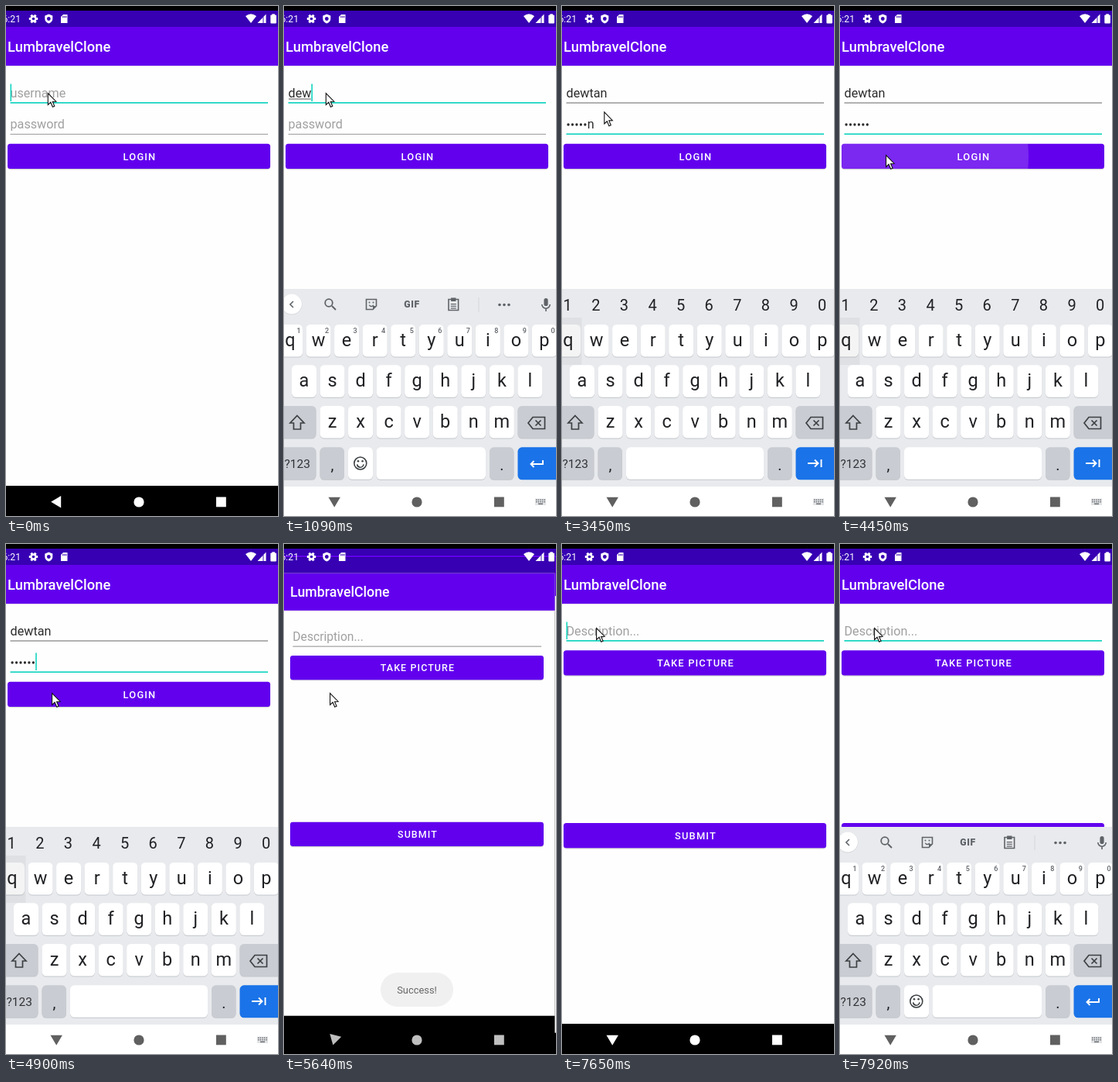
An HTML page with a canvas that plays this animation: 352 px wide and 658 px high, repeating every 8 s.

```html
<!DOCTYPE html>
<html lang="en">
<head>
<meta charset="utf-8">
<title>Login demo</title>
<style>
  html, body { margin: 0; width: 100%; height: 100%; overflow: hidden; background: #000; }
  canvas { display: block; width: 352px; height: 658px; }
</style>
</head>
<body>
<canvas id="stage"></canvas>
<script>
const W = 352, H = 658, LOOP = 8000, STEP = 90;
const USER = 'dewtan', TITLE = 'LumbravelClone';
const PURPLE = '#6200ee', DARK = '#3700b3', TEAL = '#14d4c0';
const INK = '#202124', GREY = '#5f6368', HINT = '#a0a0a0', KEY_GREY = '#c9ccd2';
// Moments of the story in ms.
const NAME_KEYS = 730, PASS_FOCUS = 1900, PASS_BOARD = 2170, PASS_KEYS = 2440;
const PRESS = 4360, SWITCH = 5460, POST_FOCUS = 7290;

const canvas = document.getElementById('stage');
const c = canvas.getContext('2d');
const dpr = window.devicePixelRatio || 1;
canvas.width = W * dpr;
canvas.height = H * dpr;

const clamp = (v, max = 1) => Math.max(0, Math.min(max, v));
const easeOut = p => 1 - (1 - p) ** 2;
const count = (t, start, gap) => clamp(Math.floor((t - start) / gap + 1e-6) + 1, USER.length);
// Progress 0..1 in n hard steps, the first one taken at start.
const steps = (t, start, n) => clamp((Math.floor((t - start) / STEP + 1e-6) + 1) / n);
const blink = (t, since) => (t - since) % 1000 < 500;
const board = t => easeOut(steps(t, 820, 3)) - steps(t, SWITCH, 3) + easeOut(steps(t, 7740, 3));

function rect(x, y, w, h, color) {
  c.fillStyle = color;
  c.fillRect(x, y, w, h);
}
function round(x, y, w, h, r, color) {
  c.fillStyle = color;
  c.beginPath();
  c.roundRect(x, y, w, h, r);
  c.fill();
}
function disc(x, y, r, color) {
  c.fillStyle = color;
  c.beginPath();
  c.arc(x, y, r, 0, 7);
  c.fill();
}
function arc(x, y, r, from, to, color, width) {
  c.beginPath();
  c.arc(x, y, r, from, to);
  c.strokeStyle = color;
  c.lineWidth = width;
  c.stroke();
}
function path(d, { fill, stroke, width = 1.7 }) {
  const p = new Path2D(d);
  if (fill) { c.fillStyle = fill; c.fill(p); }
  if (stroke) { c.strokeStyle = stroke; c.lineWidth = width; c.stroke(p); }
}
function placed(x, y, draw, turn = 0) {
  c.save();
  c.translate(x, y);
  c.rotate(turn);
  draw();
  c.restore();
}
function text(s, x, y, size, color, { weight = 400, align = 'left', gap = 0 } = {}) {
  c.font = `${weight} ${size}px Roboto, sans-serif`;
  c.letterSpacing = gap + 'px';
  c.textAlign = align;
  c.fillStyle = color;
  c.fillText(s, x, y);
  const w = c.measureText(s).width;
  c.letterSpacing = '0px';
  return w;
}

// Screens
function chrome() {
  rect(-13, 6, 370, 652, '#000');
  rect(-13, 6, 370, 21, DARK);
  rect(-13, 27, 370, 592, '#fefefe');
  rect(-13, 77, 370, 1, '#ececec');
  rect(-13, 27, 370, 50, PURPLE);
  text(TITLE, 2, 59, 18.4, '#fff', { weight: 500 });
}
function field(y, value, hint, focused, idle) {
  if (focused) rect(5.5, y + 24, 333.5, 1.7, TEAL);
  else rect(5.5, y + 24.5, 333.5, 1, idle);
  if (hint) text(hint, 5.5, y + 18, 16.2, HINT);
  return text(value, 5.5, y + 18, 16.2, '#2b2b2b');
}
const caret = (x, y) => rect(x, y + .5, 1.6, 22.5, TEAL);

function button(label, y, press = 0) {
  round(2, y + 1, 340, 32.5, 4, 'rgba(0,0,0,.16)');
  round(2, y, 340, 32.3, 3.5, PURPLE);
  if (press > 0 && press < 1) {
    c.save();
    c.beginPath();
    c.roundRect(2, y, 340, 32.3, 3.5);
    c.clip();
    disc(60, y + 16, 40 + 360 * press, `rgba(255,255,255,${.26 * (1 - press)})`);
    c.restore();
  }
  text(label, 173, y + 21, 12.9, '#fff', { weight: 500, align: 'center', gap: 1.15 });
}

function loginScreen(t) {
  chrome();
  const onPass = t >= PASS_FOCUS;
  const n = count(t, NAME_KEYS, 2 * STEP);
  const w = field(100, USER.slice(0, n), n ? '' : 'username', !onPass, '#666');
  if (n && !onPass) rect(6, 119.5, w - 1, 1, '#555');
  const nameKey = n ? NAME_KEYS + (n - 1) * 2 * STEP : -410;
  if (!onPass && blink(t, nameKey)) caret(5.5 + w, 100);

  const m = count(t, PASS_KEYS, STEP);
  const dots = t >= PRESS ? m : Math.max(0, m - 1);
  field(140.4, '', m ? '' : 'password', onPass, '#9a9a9a');
  for (let i = 0; i < dots; i++) disc(8.1 + i * 5.45, 153, 1.65, '#2b2b2b');
  let x = 5.5 + dots * 5.45;
  if (m > dots) x += text(USER[m - 1], x, 158, 16.2, '#2b2b2b');
  const passKey = m ? PASS_KEYS + (m - 1) * STEP : PASS_FOCUS;
  if (onPass && blink(t, passKey)) caret(x, 140);
  button('LOGIN', 177.8, steps(t, PRESS, 5));
}

function postScreen(t) {
  chrome();
  const focused = t >= POST_FOCUS;
  field(100, '', 'Description...', focused, '#8a8a8a');
  if (focused && blink(t, POST_FOCUS)) caret(5.5, 100);
  button('TAKE PICTURE', 137.3);
  button('SUBMIT', 360);
}

function scaled(s, alpha, draw) {
  c.save();
  c.globalAlpha = alpha;
  c.translate(172, 327);
  c.scale(s, s);
  c.translate(-172, -327);
  draw();
  c.restore();
}
function screens(t) {
  const p = steps(t, SWITCH, 6);
  if (p < 1) scaled(1 + .08 * p, 1, () => loginScreen(t));
  if (p > 0) scaled(1 - .141 * (1 - p) ** 2, clamp(p * 2.4), () => postScreen(t));
}
function toast(t) {
  const a = steps(t, 5550, 3) - steps(t, 7470, 3);
  c.save();
  c.globalAlpha = clamp(a * 1.5);
  round(125, 553, 94, 44, 22, '#f0f0f0');
  c.globalAlpha = a;
  text('Success!', 172, 580, 12.9, '#222', { align: 'center' });
  c.restore();
}

// Keyboard
function key(x, y, w, color = '#fff') {
  round(x, y + 1, w, 41.5, 5.5, '#c4c7cc');
  round(x, y, w, 41.5, 5.5, color);
}
function letters(row, cx, y, hints) {
  [...row].forEach((ch, i) => {
    const x = cx + i * 36.55;
    key(x - 16, y, 32);
    text(ch, x, y + 27.5, 23.5, INK, { align: 'center' });
    if (hints) text((i + 1) % 10, x + 11, y + 10.5, 9, GREY, { align: 'center', weight: 500 });
  });
}
function digits() {
  for (let i = 0; i < 10; i++) text((i + 1) % 10, 7.2 + i * 36.6, 393, 20, INK, { align: 'center' });
}

function toolbar() {
  const pen = { stroke: GREY, width: 1.6 };
  disc(10, 385, 13.5, 'rgba(0,0,0,.08)');
  disc(10, 384.6, 13, '#fff');
  placed(10, 385, () => path('M2-4l-4 4 4 4', pen));
  placed(58, 383, () => {
    arc(0, 0, 4.8, 0, 7, GREY, 1.8);
    path('M4 4l5 5', { stroke: GREY, width: 2 });
  });
  placed(113, 385, () => {
    path('M-6.5-6.5h13v8.5l-4.5 4.5h-8.5z', pen);
    path('M6 2h-4v4z', { fill: GREY });
    for (const x of [-2.5, 2.5]) disc(x, -2.5, 1, GREY);
    arc(0, -.5, 3, .4, 2.7, GREY, 1.4);
  });
  text('GIF', 165.5, 389.3, 12.2, GREY, { weight: 900, align: 'center', gap: .6 });
  placed(219.3, 385.5, () => {
    path('M-6.3-7h12.6v14h-12.6z', pen);
    rect(-3.2, -9, 6.4, 4.5, GREY);
    for (let i = 0; i < 3; i++) rect(-3.5, -1.5 + i * 2.7, 7, 1.2, GREY);
  });
  rect(251.5, 376, 1, 19, '#d3d6da');
  for (let i = -1; i < 2; i++) disc(285 + 6 * i, 385.5, 1.8, GREY);
  placed(339, 385, () => {
    round(-2.6, -8, 5.2, 10, 2.6, GREY);
    arc(0, 0, 5.2, 0, Math.PI, GREY, 1.6);
    path('M0 5v4', pen);
  });
}

function specialKeys(secret) {
  const pen = { stroke: '#3c4043' }, white = { stroke: '#fff', width: 1.9 };
  key(-14, 516, 55.5, KEY_GREY);
  placed(17, 538, () => path('M0-9.5L9 0H4.5v8h-9V0H-9z', pen));
  key(302.5, 516, 62, KEY_GREY);
  placed(329, 538, () => path('M-13 0l6-7.5H8.5v15H-7zM-3.5-3.5l7 7m0-7l-7 7', pen));

  key(-14, 569.3, 55.5, KEY_GREY);
  text('?123', 34, 596, 15.5, '#303236', { align: 'right' });
  key(46.5, 569.3, 31.5, KEY_GREY);
  text(',', 62.5, 599, 20, INK, { align: 'center' });
  if (secret) key(83, 569.3, 178);
  else {
    key(83, 569.3, 32);
    key(119.5, 569.3, 141.5);
    placed(98.8, 590, () => {
      arc(0, 0, 8, 0, 7, '#3c4043', 1.6);
      arc(0, 1, 4.2, .1, 3.04, '#3c4043', 1.6);
      for (const x of [-2.8, 2.8]) disc(x, -2.7, 1.3, '#3c4043');
    });
  }
  key(266, 569.3, 31.5, KEY_GREY);
  text('.', 281.8, 599, 20, INK, { align: 'center' });
  round(302.5, 569.3, 62, 42, 5.5, '#1a73e8');
  placed(327, 590, () => path(secret ? 'M-9 0H4M0-4.5L4.5 0 0 4.5M8.5-5V5' : 'M8-4v5H-7m3.5-4l-4 4 4 4', white));
}

function keyboard(t) {
  const shown = board(t);
  if (shown <= 0) return;
  const secret = t >= PASS_BOARD && t < POST_FOCUS;
  placed(0, 300 * (1 - shown), () => {
    rect(0, 365, W, 293, '#e8eaed');
    if (secret) digits();
    else toolbar();
    letters('qwertyuiop', 8, 411, !secret);
    letters('asdfghjkl', 26, 463.3);
    letters('zxcvbnm', 62.5, 516);
    specialKeys(secret);
    if (secret) rect(0, 402, 25.5, 61, 'rgba(0,0,0,.045)');
  });
  if (shown > .8) {
    rect(0, 620, W, 38, '#fff');
    rect(325, 635.5, 14, 8.5, '#e2e3e5');
    for (let i = 0; i < 10; i++) rect(326 + (i % 5) * 2.6, i < 5 ? 636.5 : 639, 1.4, 1.4, GREY);
    rect(329, 641.7, 6, 1.3, GREY);
  }
}

// System bars and pointer
function navIcons(t) {
  const p = steps(t, SWITCH, 6);
  const moving = p > 0 && p < 1;
  const shade = moving ? clamp(1 - 1.2 * p) : board(t) > .8 ? 1 : 0;
  const tone = 255 - 159 * shade;
  const color = `rgb(${tone},${tone},${tone})`;
  const turn = clamp((t - 90) / 550) ** 3 - p ** 2.6 + steps(t, 7470, 3);
  placed(65.2, 639.7, () => path('M-7 0L6-7.7V7.7z', { fill: color }), -turn * Math.PI / 2);
  disc(172, 640, 6.6, color);
  rect(272, 633.5, 12.8, 12.8, color);
}

function statusBar() {
  const white = { fill: '#fff' };
  text('6:21', 19, 21, 12.2, '#fff', { align: 'right' });
  for (let i = 0; i < 3; i++) placed(35.5, 16.5, () => rect(-5.7, -1.5, 11.4, 3, '#fff'), i * Math.PI / 3);
  disc(35.5, 16.5, 4.2, '#fff');
  disc(35.5, 16.5, 1.8, DARK);
  placed(55.3, 16.5, () => path('M0-6l5 2v4q0 4-5 6q-5-2-5-6v-4z', white));
  disc(55.3, 16.5, 2.4, DARK);
  placed(71, 11, () => path('M3 0h5.5v11H0V3z', white));
  for (let i = 0; i < 3; i++) rect(73.3 + 2 * i, 12.8, 1, 2.4, DARK);
  placed(317, 22, () => path('M0 0l-7-9q7-5.5 14 0z', white));
  placed(336.5, 22, () => path('M0 0v-11.5L-11 0z', white));
  rect(332.5, 14, .9, 8, DARK);
  rect(344.3, 10.3, 3.6, 2, '#fff');
  round(342.3, 11.5, 7.6, 11, 1, '#fff');
}

function pointer(t) {
  const a = easeOut(steps(t, 3450, 6)), b = easeOut(steps(t, 6750, 5));
  placed(53.8 + 5.3 * a * a - 15 * b, 112 + 80 * a - 84 * b, () =>
    path('M.5.5v15l3.5-3.2 2.6 6 2.4-1-2.5-5.9 4.5-.2z', { fill: '#fff', stroke: '#111', width: 1.1 }));
}

function draw(t) {
  c.setTransform(dpr, 0, 0, dpr, 0, 0);
  rect(0, 0, W, H, '#000');
  c.save();
  c.beginPath();
  c.rect(0, 6, W, H - 6);
  c.clip();
  for (const layer of [screens, toast, keyboard, navIcons, statusBar, pointer]) layer(t);
  c.restore();
}

const begin = performance.now();
function frame() {
  draw((performance.now() - begin) % LOOP);
  requestAnimationFrame(frame);
}
frame();
</script>
</body>
</html>
```
